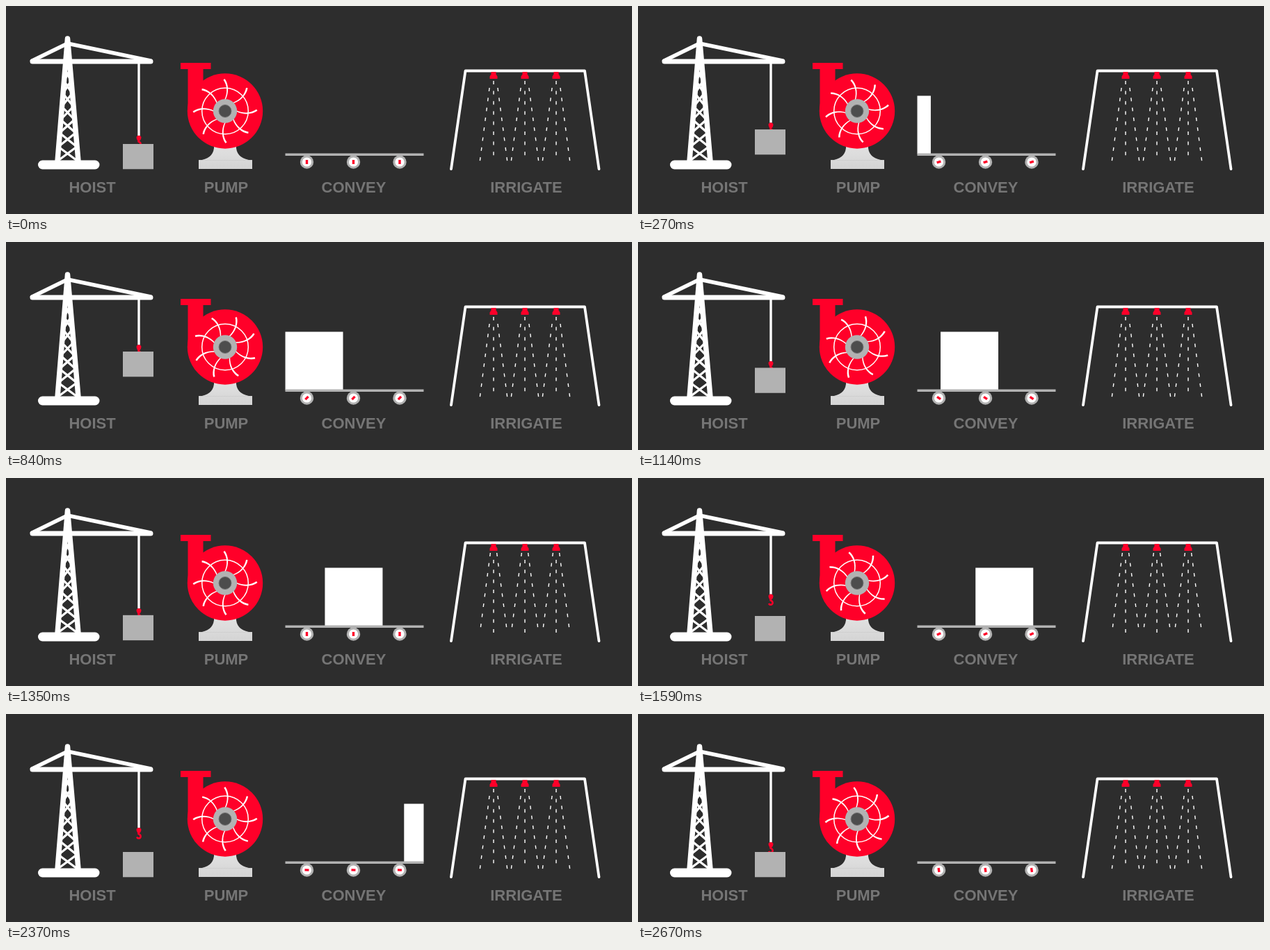
Animation, 900 px wide and 300 px high, one loop 2.7 s. Source, as an HTML page:

```html
<!DOCTYPE html>
<html lang="en">
<head>
<meta charset="utf-8">
<title>Hoist, pump, convey, irrigate</title>
<style>
  html, body { margin: 0; width: 100%; height: 100%; overflow: hidden; background: #2d2d2d; }
  svg { display: block; width: 900px; height: 300px; }
  text { font: bold 22px "Liberation Sans", Arial, sans-serif; fill: #757575; text-anchor: middle; }
  .line { fill: none; stroke: #fff; stroke-linecap: round; stroke-linejoin: round; }
</style>
</head>
<body>
<svg viewBox="0 0 900 300">
  <defs>
    <clipPath id="beltClip"><rect x="401.5" y="120" width="199" height="100"/></clipPath>
    <linearGradient id="footFill" x2="0" y2="1">
      <stop stop-color="#e2e2e2"/><stop offset="1" stop-color="#d4d4d4"/>
    </linearGradient>
  </defs>

  <g id="hoist">
    <line id="rope" x1="191" y1="80" x2="191" stroke="#fff" stroke-width="3.4"/>
    <g id="hook">
      <path d="M187.5 3.5a3.6 3.6 0 0 1 7 0q0 2.5-2 5h-3q-2-2.5-2-5z" fill="#ff0029"/>
      <path d="M190.5 7L190.5 9.5Q194 11 193.6 13.8A2.8 2.8 0 0 1 188.2 14" fill="none" stroke="#ff0029" stroke-width="2.5"/>
    </g>
    <rect id="crate" x="168" width="44" height="36.3" fill="#b2b2b2"/>
    <path class="line" stroke-width="7" d="M38 80H208"/>
    <path class="line" stroke-width="5.5" d="M37.5 79L88.5 54L208 79"/>
    <path class="line" stroke-width="7.5" d="M74 224L88.5 47L104 224"/>
    <path class="line" stroke-width="3.2" id="lattice"/>
    <rect x="46" y="222.5" width="88.5" height="13" rx="6.5" fill="#fff"/>
  </g>

  <g id="pump">
    <path d="M299 200H331V205Q333 221 354 222.5V235H277V222.5Q297 221 299 205Z" fill="url(#footFill)"/>
    <path d="M277 222.5H354" stroke="#cfcfcf"/>
    <path d="M251 82H294.5V91H283.5V108L315 152H261.5V91H251Z" fill="#ff0029"/>
    <g transform="translate(315 151.5)">
      <circle r="54.2" fill="#ff0029"/>
      <circle r="33.3" fill="none" stroke="#fff" stroke-width="1.5"/>
      <g id="blades" fill="#fff"></g>
      <circle r="17.2" fill="#b2b2b2"/>
      <circle r="9" fill="#4d4d4d" stroke="#777" stroke-width="1"/>
    </g>
  </g>

  <g id="convey">
    <rect id="parcel" y="129.5" width="83" height="84" fill="#fff" clip-path="none"/>
    <rect x="401.5" y="212.5" width="199" height="3.5" fill="#b2b2b2"/>
    <g id="rollers"></g>
  </g>

  <g id="irrigate">
    <path class="line" stroke-width="3.8" d="M640 235L660.5 93.5H832L852.5 235"/>
    <g id="nozzles" fill="#ff0029"></g>
    <path id="spray" fill="none" stroke="#fff" stroke-width="1.4"/>
  </g>

  <text x="124" y="269">HOIST</text>
  <text x="316.5" y="269">PUMP</text>
  <text x="500" y="269">CONVEY</text>
  <text x="748" y="269">IRRIGATE</text>
</svg>
<script>
const LOOP = 2700, STEP = 30;
const $ = id => document.getElementById(id);
const lerp = (a, b, k) => a + (b - a) * k;
const set = (el, attrs) => Object.entries(attrs).forEach(([k, v]) => el.setAttribute(k, v));

// Crossed braces between the mast legs
const leg = (y, side) => 88.5 + side * (y - 47) * 0.085;
const levels = [92, 108, 126, 145, 164, 183, 203, 224];
$('lattice').setAttribute('d', levels.slice(1).map((y, i) => {
  const top = levels[i];
  return `M${leg(top, -1)} ${top}L${leg(y, 1)} ${y}M${leg(top, 1)} ${top}L${leg(y, -1)} ${y}`;
}).join(''));

$('blades').innerHTML = Array.from({ length: 8 }, (_, i) =>
  `<path transform="rotate(${i * 45})" d="M-.5 -46.5C5 -39 6 -27 .5 -16H-1C4 -27 3 -37 -2.5 -45Z"/>`).join('');

$('rollers').innerHTML = [432.5, 499.5, 566].map(x =>
  `<g transform="translate(${x} 225)"><circle r="9.7" fill="#b2b2b2"/><circle r="6.6" fill="#fff"/>
   <rect class="key" x="-1.7" y="-3" width="3.4" height="6" fill="#ff0029"/></g>`).join('');
const keys = document.querySelectorAll('.key');

const heads = [701, 746, 791];
$('nozzles').innerHTML = heads.map(x =>
  `<path d="M${x - 3.5} 95h7v3.5l2 3v3.5h-11v-3.5l2-3z"/>`).join('');

// Eight dashes per jet; neighbouring jets are half a period apart
function sprayPath(shifted) {
  let d = '';
  for (const x of heads) for (const side of [-1, 0, 1]) {
    const late = (side !== 0) !== shifted;
    for (let i = 0; i < 8; i++) {
      const y = late ? 118 + 14.3 * i : 108 + 14.6 * i;
      const at = v => x + side * (4.5 + (v - 107) * 0.13);
      d += `M${at(y)} ${y}L${at(y + 5)} ${y + 5}`;
    }
  }
  return d;
}
const sprays = [sprayPath(false), sprayPath(true)];

// [time, height of the hook above its lowest point]
const lift = [[0, 2.5], [30, 0], [660, 55], [1365, 0], [1935, 55], [2700, 2.5]];
function liftAt(t) {
  const i = lift.findIndex(p => p[0] > t);
  const [t0, a] = lift[i - 1], [t1, b] = lift[i];
  return lerp(a, b, (t - t0) / (t1 - t0));
}

function draw(t) {
  const height = liftAt(t), hookY = 188.5 - height;
  $('rope').setAttribute('y2', hookY + 1);
  $('hook').setAttribute('transform', `translate(0 ${hookY})`);
  $('crate').setAttribute('y', 199 - (t >= 30 && t < 1365 ? height : 0));

  $('blades').setAttribute('transform', `rotate(${360 * t / LOOP})`);

  const left = 307.8 + 0.1116 * t;
  const from = Math.max(left, 401.5), to = Math.min(left + 83, 600.5);
  set($('parcel'), { x: from, width: Math.max(0, to - from) });
  keys.forEach(k => k.setAttribute('transform', `rotate(${720 * t / LOOP})`));

  const phase = t / STEP % 10;
  $('spray').setAttribute('d', sprays[phase >= 1 && phase < 6 ? 1 : 0]);
}

function tick() {
  draw(Math.floor(performance.now() % LOOP / STEP) * STEP);
  requestAnimationFrame(tick);
}
tick();
</script>
</body>
</html>
```
